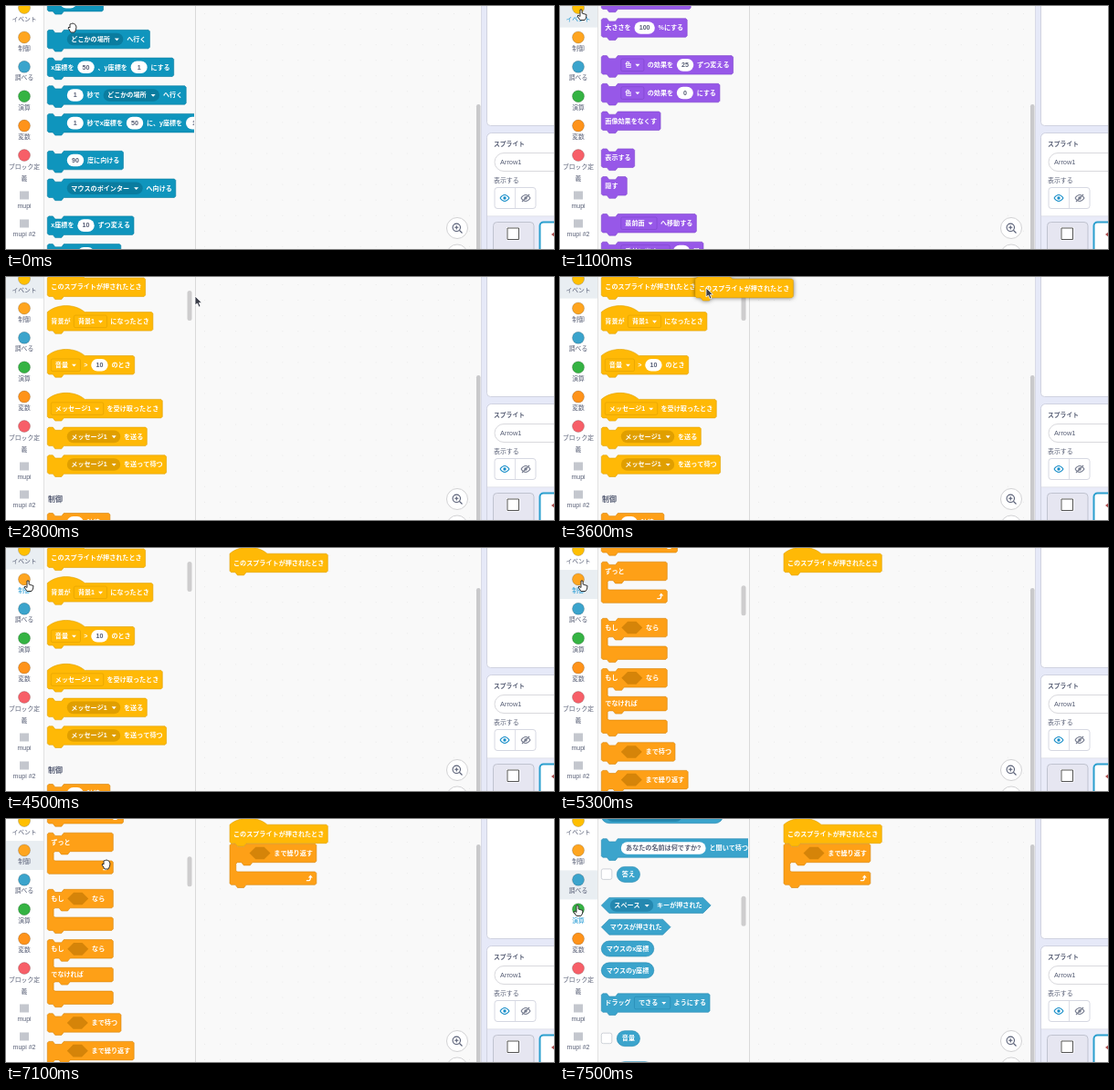
Recreate the animation shown at these times as an HTML page with a canvas. Size 600 by 267 pixels, loop 8000 ms.

```html
<!DOCTYPE html>
<html lang="ja">
<head>
<meta charset="utf-8">
<style>
html, body { margin: 0; width: 100%; height: 100%; overflow: hidden; background: #f9f9f9; }
canvas { display: block; }
</style>
</head>
<body>
<canvas id="stage" width="600" height="267"></canvas>
<script>
const ctx = document.getElementById('stage').getContext('2d');
const FONT = "'Liberation Sans', 'Noto Sans CJK JP', 'Noto Sans CJK', sans-serif";
const INK = '#575e75', HOVER = '#1a96d2';
const ROW = 20.5, SLOT = 10.2, ARM = 14.4, GAP = 6.8, HAT = 7, PAD = 4;

// Block notation: (value) [round menu] {square menu} <> boolean slot.
// Prefixes: ^ hat, @ loop, # endless loop, & if, % if-else, o reporter, * checkbox reporter, ! boolean; "-" is a gap.
const palette = [
  { name: '動き', color: '#0f95bd', dark: '#0a7c9f', blocks: `(10)歩動かす
↻(15)度回す
↺(15)度回す
-
[どこかの場所]へ行く
x座標を(50)、y座標を(1)にする
(1)秒で[どこかの場所]へ行く
(1)秒でx座標を(50)に、y座標を(1)に変える
-
(90)度に向ける
[マウスのポインター]へ向ける
-
x座標を(10)ずつ変える
x座標を(50)にする
y座標を(10)ずつ変える
y座標を(1)にする
-
もし端に着いたら、跳ね返る
-
回転方法を{左右のみ}にする
-
*x座標
*y座標
*向き` },
  { name: '見た目', color: '#9758e8', dark: '#7d43cb', blocks: `(こんにちは!)と(2)秒言う
(こんにちは!)と言う
(うーん…)と(2)秒考える
(うーん…)と考える
-
コスチュームを[コスチューム1]にする
次のコスチュームにする
背景を[背景1]にする
次の背景にする
-
大きさを(10)ずつ変える
大きさを(100)%にする
-
{色}の効果を(25)ずつ変える
{色}の効果を(0)にする
画像効果をなくす
-
表示する
隠す
-
{最前面}へ移動する
{手前に出す}(1)層
-
*コスチュームの{番号}
*背景の{番号}
*大きさ` },
  { name: '音', color: '#cf63cf', dark: '#b24db2', blocks: `終わるまで[ポップ]の音を鳴らす
[ポップ]の音を鳴らす
すべての音を止める
-
{ピッチ}の効果を(10)ずつ変える
{ピッチ}の効果を(100)にする
音の効果をなくす
-
音量を(-10)ずつ変える
音量を(100)%にする
*音量` },
  { name: 'イベント', color: '#ffb906', dark: '#e09f00', blocks: `^⚑が押されたとき
^{スペース}キーが押されたとき
^このスプライトが押されたとき
^背景が{背景1}になったとき
-
^{音量}>(10)のとき
-
^{メッセージ1}を受け取ったとき
[メッセージ1]を送る
[メッセージ1]を送って待つ` },
  { name: '制御', color: '#fea017', dark: '#d58409', blocks: `(1)秒待つ
-
@(10)回繰り返す
#ずっと
-
&もし<>なら
%もし<>なら
<>まで待つ
@<>まで繰り返す
-
{すべてを止める}
-
^クローンされたとき
[自分自身]のクローンを作る
このクローンを削除する` },
  { name: '調べる', color: '#3ba4cc', dark: '#2488b0', blocks: `![マウスのポインター]に触れた
!(   )色に触れた
!(   )色が(   )色に触れた
o[マウスのポインター]までの距離
-
(あなたの名前は何ですか?)と聞いて待つ
*答え
-
![スペース]キーが押された
!マウスが押された
oマウスのx座標
oマウスのy座標
-
ドラッグ{できる}ようにする
-
*音量
-
*タイマー
タイマーをリセット` }
];
const [motion, looks, , events, control, sensing] = palette;

const HEIGHTS = { '^': HAT + 23.9, '@': 48.5, '&': 48.5, '#': 45.1, '%': 74.3, o: 17, '*': 17, '!': 17 };

let layoutY = 0;
for (const cat of palette) {
  cat.start = layoutY;
  cat.items = [];
  for (const line of cat.blocks.split('\n')) {
    if (line === '-') { layoutY += 10.2; continue; }
    cat.items.push({ line, y: layoutY });
    layoutY += (HEIGHTS[line[0]] || 23.9) + GAP;
  }
  layoutY += 33;
}

function text(str, x, y, color = INK, size = 7.1, weight = 'bold', align = 'left') {
  ctx.font = `${weight} ${size}px ${FONT}`;
  ctx.textAlign = align;
  ctx.textBaseline = 'middle';
  ctx.fillStyle = color;
  ctx.fillText(str, x, y + .3);
}

function paint(fill, stroke, width = 1) {
  if (fill) { ctx.fillStyle = fill; ctx.fill(); }
  if (stroke) { ctx.strokeStyle = stroke; ctx.lineWidth = width; ctx.stroke(); }
}

function rounded(x, y, w, h, r, fill, stroke, width) {
  ctx.beginPath();
  ctx.roundRect(x, y, w, h, r);
  paint(fill, stroke, width);
}

function circle(x, y, r, fill, stroke, width) {
  ctx.beginPath();
  ctx.arc(x, y, r, 0, 7);
  paint(fill, stroke, width);
}

function rect(x, y, w, h, fill) {
  ctx.fillStyle = fill;
  ctx.fillRect(x, y, w, h);
}

function polygon(points, x, y, fill, stroke, width) {
  ctx.beginPath();
  points.forEach(([px, py]) => ctx.lineTo(x + px, y + py));
  ctx.closePath();
  paint(fill, stroke, width);
}

function hexagon(x, y, w, h, fill, stroke) {
  const m = h / 2;
  polygon([[0, m], [m, 0], [w - m, 0], [w, m], [w - m, h], [m, h]], x, y, fill, stroke, .6);
}

function parse(line) {
  ctx.font = `bold 7.1px ${FONT}`;
  return [...line.matchAll(/\((.*?)\)|\[(.*?)\]|\{(.*?)\}|<>|[^(\[{<]+/g)].map(m => {
    const [all, value, round, square] = m;
    const type = value !== undefined ? 'value' : round ? 'round' : square ? 'square' : all === '<>' ? 'slot' : 'label';
    const label = value ?? round ?? square ?? all;
    const w = ctx.measureText(label).width;
    const width = { value: Math.max(18, w + 10.5), round: w + 19, square: w + 18, slot: 23, label: w }[type];
    return { type, label, width };
  });
}

function notch(x, y, leftward) {
  const points = [[6, 0], [8.5, 3.2], [15.5, 3.2], [18, 0]];
  if (leftward) points.reverse();
  points.forEach(([px, py]) => ctx.lineTo(x + px, y + py));
}

const MOUTHS = { '@': [ROW, ARM], '&': [ROW, ARM], '#': [ROW, ARM], '%': [ROW, 15.6, ARM] };

function blockPath(kind, x, y, w) {
  const rows = MOUTHS[kind] || [ROW];
  ctx.beginPath();
  if (kind === '^') {
    ctx.moveTo(x, y);
    ctx.bezierCurveTo(x + 10.7, y - 9.4, x + 30.3, y - 9.4, x + 41, y);
  } else {
    ctx.moveTo(x, y + 1.5);
    ctx.lineTo(x + 1.5, y);
    notch(x, y);
  }
  rows.forEach((h, i) => {
    const last = i === rows.length - 1, inset = last ? 0 : 6.8;
    ctx.lineTo(x + w - 1.5, y);
    ctx.lineTo(x + w, y + 1.5);
    y += h;
    ctx.lineTo(x + w, y - 1.5);
    ctx.lineTo(x + w - 1.5, y);
    if (!(last && kind === '#')) notch(x + inset, y, true);
    ctx.lineTo(x + inset + 1.5, y);
    ctx.lineTo(x + inset, y + (last ? -1.5 : 1.5));
    if (!last) {
      y += SLOT;
      ctx.lineTo(x + inset, y - 1.5);
      ctx.lineTo(x + inset + 1.5, y);
    }
  });
  ctx.closePath();
  return y;
}

function loopArrow(x, y) {
  ctx.beginPath();
  ctx.moveTo(x - 3, y + 2.5);
  ctx.lineTo(x, y + 2.5);
  ctx.quadraticCurveTo(x + 1.5, y + 2.5, x + 1.5, y - 1);
  paint(null, '#fff', 1.3);
  polygon([[-1, 0], [1.5, -3], [4, 0]], x, y - .5, '#fff');
}

function block(line, x, y, { color, dark }, lifted) {
  const kind = line[0] in HEIGHTS ? line[0] : '';
  const parts = parse(kind ? line.slice(1) : line);
  const oval = kind === 'o' || kind === '*';
  if (kind === '*') {
    rounded(x, y + 2.5, 11.5, 11.5, 2, '#fff', '#c3c8d0', .8);
    x += 17;
  }
  if (kind === '^') y += HAT;
  const notched = !oval && kind !== '!' && kind !== '^';
  const pad = oval ? 5.5 : kind === '!' ? 9.5 : PAD;
  const lead = notched && parts[0].type !== 'label' ? 21.5 : pad;
  const content = parts.reduce((sum, p) => sum + p.width, 0) + 3.8 * (parts.length - 1);
  const w = Math.max(lead + content + pad, MOUTHS[kind] ? 72 : notched ? 28 : 0);

  ctx.save();
  ctx.lineJoin = 'round';
  if (lifted) { ctx.shadowColor = 'rgba(0,0,0,.6)'; ctx.shadowBlur = 5; }
  let bottom = y;
  if (oval) rounded(x, y, w, 17, 8.5, color);
  else if (kind === '!') hexagon(x, y, w, 17, color);
  else { bottom = blockPath(kind, x, y, w); paint(color); }
  ctx.shadowColor = 'transparent';
  paint(null, dark, .6);

  const mid = y + (oval || kind === '!' ? 8.5 : ROW / 2);
  let cx = x + lead;
  for (const { type, label, width } of parts) {
    if (type === 'value') {
      rounded(cx, mid - 6.8, width, 13.6, 6.8, '#fff');
      text(label, cx + width / 2, mid, INK, 7.1, 'bold', 'center');
    } else if (type === 'slot') {
      hexagon(cx, mid - 6.8, width, 13.6, dark);
    } else if (type === 'label') {
      text(label, cx, mid, '#fff');
    } else {
      if (type === 'round') rounded(cx, mid - 6.8, width, 13.6, 6.8, dark);
      else rounded(cx, mid - 6.8, width, 13.6, 1.7, color, dark, .6);
      text(label, cx + 4.5, mid, '#fff');
      polygon([[0, 0], [5, 0], [2.5, 2.8]], cx + width - 9.5, mid - 1, '#fff');
    }
    cx += width + 3.8;
  }
  if (kind === '%') text('でなければ', x + PAD, y + ROW + SLOT + 7.8, '#fff');
  if (kind === '@' || kind === '#') loopArrow(x + w - 8, bottom - ARM / 2);
  ctx.restore();
}

// The scroll that puts a category's first block at height y.
const scrollTo = (cat, y) => cat.start - y;
const REST = {
  motion: scrollTo(motion, -76), passing: scrollTo(looks, -283), events: scrollTo(events, -81.5),
  control: scrollTo(control, -81), sensing: scrollTo(sensing, -83.7)
};

function scrollAt(t) {
  const ease = (from, to, steps) => to + (from - to) * .5 ** steps;
  if (t < 1100) return REST.motion;
  if (t < 1600) return ease(REST.passing, REST.events, (t - 1100) / 100);
  if (t < 5000) return REST.events;
  if (t < 5300) return ease(REST.events, REST.control, (t - 4900) / 100);
  return t < 7500 ? REST.control : REST.sensing;
}

const selectedAt = t => t < 1100 ? motion : t < 5000 ? events : t < 7500 ? control : sensing;

// time, x, y, pointer
const moves = [
  [0, 73, 24, 'open'], [500, 45, 14, 'arrow'], [600, 22, 6, 'point'], [1100, 23, 4, 'point'],
  [2100, 80, 14, 'arrow'], [2200, 150, 19, 'arrow'], [2300, 198, 21, 'arrow'], [2800, 207, 21, 'arrow'],
  [2900, 160, 17, 'arrow'], [3000, 100, 12, 'open'], [3100, 57, 11, 'open'],
  [3600, 160, 12, 'arrow'], [3700, 257, 16, 'arrow'],
  [4200, 257, 20, 'arrow'], [4300, 150, 26, 'arrow'], [4400, 60, 34, 'open'], [4500, 24, 36, 'point'],
  [5800, 45, 160, 'open'], [5900, 55, 250, 'open'],
  [6200, 90, 220, 'arrow'], [6300, 180, 140, 'arrow'], [6400, 254, 65, 'arrow'], [6500, 255, 40, 'arrow'], [6600, 255, 30, 'arrow'],
  [7100, 110, 50, 'open'], [7200, 20, 64, 'point'], [7500, 19, 95, 'point']
];

function pointer(x, y, shape) {
  ctx.lineJoin = 'round';
  if (shape === 'arrow') {
    polygon([[0, 0], [0, 10], [2.4, 8], [4.2, 12], [6, 11.2], [4.4, 7.4], [7.4, 7.2]], x, y, '#3a3d48', '#fff', .8);
  } else if (shape === 'point') {
    polygon([[-1, 0], [1, 0], [1.2, 4], [6, 5.5], [5.5, 9], [4, 11.5], [-1, 11.5], [-4, 7], [-3, 6], [-1, 7.5]], x, y, '#fff', '#333', 1);
  } else {
    polygon([[-3, -4], [-1.5, -4.5], [0, -5], [1.5, -4.5], [3, -3.5], [4, -1], [3.5, 2], [2, 5], [-2, 5], [-5, 0], [-4, -1], [-3, 0]], x, y, '#fff', '#333', 1);
  }
}

function drawCategories(t, mouse) {
  rect(0, 0, 41, 267, '#fff');
  const selected = palette.indexOf(selectedAt(t)) - palette.indexOf(events);
  if (selected >= 0) rect(0, selected * 32.4 - 8.4, 41, 32, '#e9eef2');
  const rows = [['イベント', '#ffbf00'], ['制御', '#ffa51f'], ['調べる', '#3ba4cc'], ['演算', '#35b343'], ['変数', '#ff931a'], ['ブロック定', '#f75f68']];
  rows.forEach(([label, color], i) => {
    const y = 2 + i * 32.4;
    const hovered = mouse.x < 41 && mouse.y + 4 > y - 10 && mouse.y + 4 < y + 22;
    circle(20, y, 6.5, color, 'rgba(0,0,0,.25)', .7);
    text(label, 20, y + 12.5, hovered ? HOVER : INK, 6.8, '500', 'center');
  });
  text('義', 20, 190, INK, 6.8, '500', 'center');
  [['mupi', 208], ['mupi #2', 239]].forEach(([label, y]) => {
    rect(15, y - 4.5, 10, 9, '#c4c7ce');
    text(label, 20, y + 12, INK, 7, '500', 'center');
  });
  rect(41, 0, .8, 267, '#dcdcdc');
}

function drawFlyout(scroll) {
  ctx.save();
  ctx.beginPath();
  ctx.rect(42, 0, 164, 267);
  ctx.clip();
  for (const cat of palette) {
    text(cat.name, 46, cat.start - scroll - 15, INK, 8, 'bold');
    for (const { line, y } of cat.items) {
      const top = y - scroll;
      if (top > -80 && top < 275) block(line, 45.3, top, cat);
    }
  }
  ctx.restore();
  rect(207, 0, 1, 267, '#dadada');
  rounded(198.5, 15 + (scroll - REST.events) * .077, 5, 33, 2.5, '#cecdce');
}

function drawWorkspace(t) {
  rect(0, 0, 600, 267, '#f9f9f9');
  for (let x = 217; x < 514; x += 17.06)
    for (let y = 8; y < 267; y += 17.06) rect(x, y, 1, 1, '#ebebeb');
  const barTop = t < 4200 ? 108 : t < 6600 ? 44 : 28;
  rounded(515, barTop, 4.5, 300, 2.2, '#c9c9cb');
  for (const y of [244, 273.5]) circle(494, y, 11.5, '#fff', '#d2d2d4', 1);
  circle(493.3, 243.3, 4.2, null, INK, 1.1);
  ctx.beginPath();
  ctx.moveTo(496.5, 246.5); ctx.lineTo(499.5, 249.5);
  ctx.moveTo(491.2, 243.3); ctx.lineTo(495.4, 243.3);
  ctx.moveTo(493.3, 241.2); ctx.lineTo(493.3, 245.4);
  paint(null, INK, 1.1);
}

function eye(x, y, color, crossed) {
  ctx.beginPath();
  ctx.moveTo(x - 5, y);
  ctx.quadraticCurveTo(x, y - 7, x + 5, y);
  ctx.quadraticCurveTo(x, y + 7, x - 5, y);
  paint(null, color, 1.1);
  circle(x, y, 1.7, color);
  if (!crossed) return;
  ctx.beginPath();
  ctx.moveTo(x - 4, y + 4);
  ctx.lineTo(x + 4, y - 4);
  paint(null, color, 1.1);
}

function drawSpritePanel() {
  rect(520.5, 0, 80, 267, '#e6e9f8');
  rect(520, 0, .8, 267, '#d3d5e2');
  rounded(526.5, -9, 90, 140.5, 4, '#fff', '#d0d2e0', 1);
  rounded(526.5, 139.5, 90, 150, 5, '#e9ebf8', '#d0d2e0', 1);
  rounded(527, 140, 90, 91, [5, 0, 0, 0], '#fff');
  rect(527, 230.5, 73, .8, '#d9dbe6');
  text('スプライト', 534, 152, INK, 6.8, 'bold');
  rounded(535, 161.5, 90, 20, 10, '#fff', '#d9d9dd', 1);
  text('Arrow1', 541, 171.5, INK, 7.4, 'normal');
  text('表示する', 534, 191.5, INK, 6.9, '500');
  rounded(535, 199.5, 45, 23, 3, '#fff', '#d6d8e2', 1);
  rect(557, 200, .8, 22, '#d6d8e2');
  eye(546, 211, '#1a8fc9');
  eye(569, 211, '#777d90', true);
  rounded(533.5, 237.5, 44.5, 40, 4, '#e6e6f1', '#c0c3d0', 1);
  rect(548, 243, 14.5, 14.5, '#fff');
  ctx.strokeStyle = '#555';
  ctx.lineWidth = 1;
  ctx.strokeRect(549, 244, 12.5, 12.5);
  rounded(584.5, 237.5, 44, 40, 4, '#fff', '#2b9fce', 2);
  polygon([[0, 0], [4, -3], [4, 3]], 597, 251, '#b05050');
}

function drawScript(t, mouse) {
  const hat = '^このスプライトが押されたとき', loop = '@<>まで繰り返す';
  if (t >= 6600) block(loop, 245, 27.2, control);
  else if (t >= 6200) block(loop, mouse.x - 10, mouse.y + 1, control, true);
  if (t >= 4200) block(hat, 245, -.8, events);
  else if (t >= 3600) block(hat, mouse.x - 12, mouse.y - 16.8, events, true);
}

function draw() {
  const t = Math.floor(performance.now() % 8000 / 100) * 100;
  const [, x, y, shape] = moves.findLast(move => move[0] <= t);
  const mouse = { x, y };
  drawWorkspace(t);
  drawFlyout(scrollAt(t));
  drawCategories(t, mouse);
  drawSpritePanel();
  drawScript(t, mouse);
  pointer(x, y, shape);
  requestAnimationFrame(draw);
}
draw();
</script>
</body>
</html>
```
